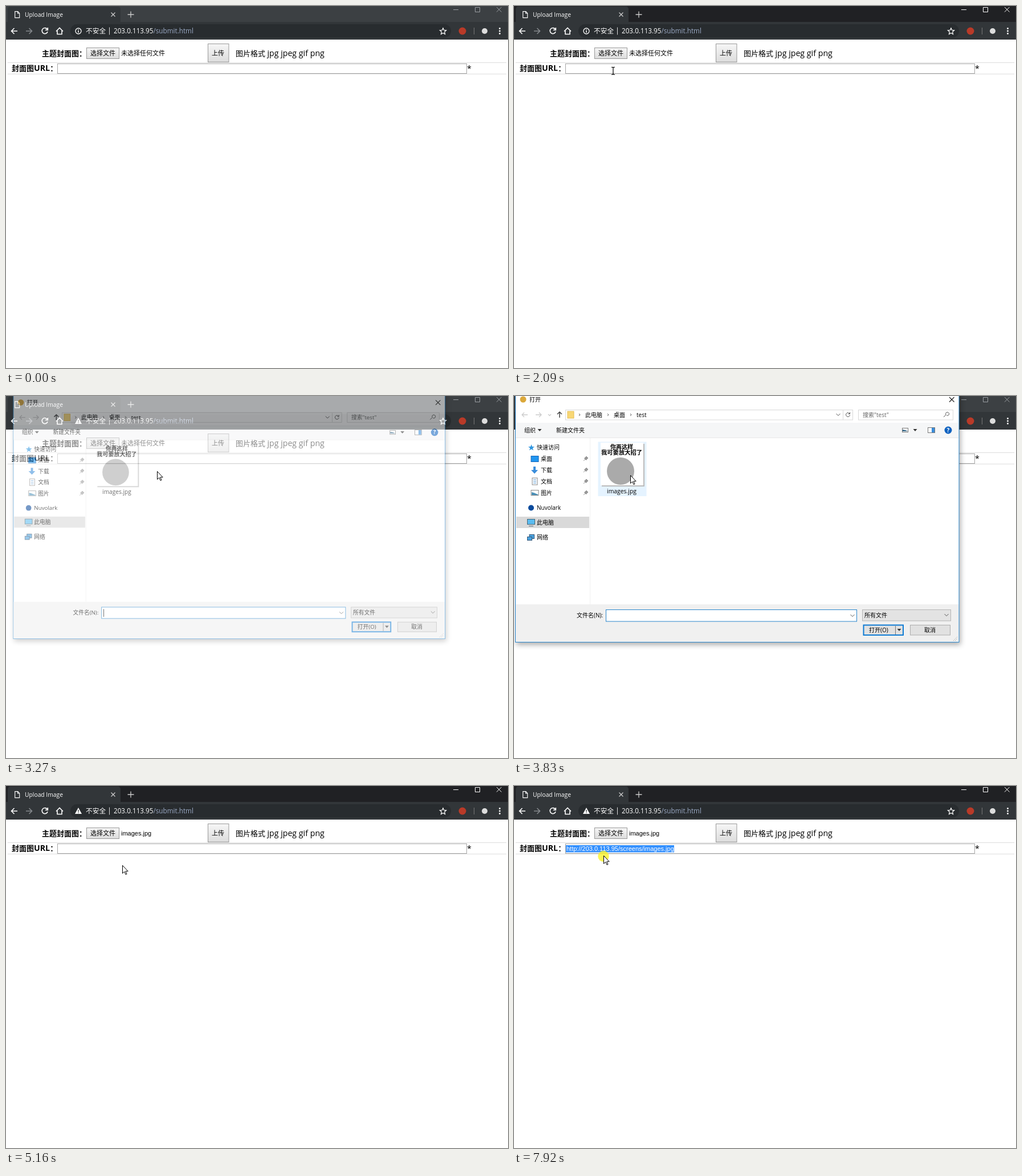
An HTML page for the animation above (8000 ms loop, 881 px wide and 636 px high).

```html
<!DOCTYPE html>
<html lang="zh-CN">
<head>
<meta charset="utf-8">
<title>Upload Image</title>
<style>
html, body { margin: 0; width: 100%; height: 100%; overflow: hidden; background: #fff; }
svg { display: block; width: 881px; height: 636px; font-family: 'Open Sans', 'Noto Sans CJK SC', 'Noto Sans CJK', sans-serif; }
text { white-space: pre; }
.arial { font-family: 'Liberation Sans', 'Noto Sans CJK SC', 'Noto Sans CJK', sans-serif; }
.line { fill: none; stroke: #fff; stroke-width: 1.6; }
.thin { fill: none; stroke: #555; }
#frame { filter: drop-shadow(2px 4px 5px #0005); }
</style>
</head>
<body>
<script>
const LOOP = 8000;
const URL_TEXT = 'http://203.0.113.95/screens/images.jpg';

// Text placed by its left edge and vertical centre.
const label = (x, cy, str, size = 10, attrs = '') =>
  `<text x="${x}" y="${cy + size * 0.37}" font-size="${size}" ${attrs}>${str}</text>`;
const box = (x, y, w, h, fill, stroke = 'none', attrs = '') =>
  `<rect x="${x}" y="${y}" width="${w}" height="${h}" fill="${fill}" stroke="${stroke}" ${attrs}/>`;
const path = (d, attrs = 'class="line"') => `<path d="${d}" ${attrs}/>`;
const dot = (x, y, r, fill, attrs = '') => `<circle cx="${x}" cy="${y}" r="${r}" fill="${fill}" ${attrs}/>`;
const big = str => `<tspan font-size="14.2">${str}</tspan>`;
const chevron = (x, y) => path(`M${x - 3.5} ${y - 2}l3.5 3.5l3.5-3.5`, 'class="thin"');
const triangle = (x, y) => path(`M${x - 3.5} ${y - 2}h7l-3.5 4z`, 'fill="#333"');
const pin = y => path(`M122 ${y + 4}l3-3m-2-2l4 4m-3-4l3-3l3 3l-3 3z`, 'fill="#999" stroke="#999"');

const browser = `
  <rect id="titleBar" width="881" height="29"/>
  ${path('M3 29V6q0-5 5-5H196q5 0 5 5V29z', 'fill="#323639"')}
  ${box(0, 28, 881, 31, '#323639')}
  ${path('M15.7 9.6h5l3 3.2v7.8h-8zm4.8 0v3.4h3.2', 'id="pageIcon" class="line" style="stroke-width:1.1"')}
  ${path('M25 15a5 5 0 1 1-5-5', 'id="spinner" class="line"')}
  ${label(33, 15, 'Upload Image', 10.3, 'fill="#fff"')}
  ${path('M184.5 11.5l7 7m0-7l-7 7M213.5 15h11m-5.5-5.5v11', 'class="line" style="stroke:#ccc;stroke-width:1.3"')}
  ${path('M785 6.5h9M823.5 2.5h8v8h-8zM861 2l8.500 8.500m0-8.500l-8.500 8.500', 'id="winButtons" fill="none"')}
  ${path('M20 44H9.500m5-5l-5 5l5 5M72.500 41a5 5 0 1 0 .5 4M73.300 38v4.300h-4.300M88 44.500l6-6l6 6M90 43.500v6h8v-6')}
  ${path('M35 44h10.500m-5-5l5 5l-5 5', 'class="line" style="stroke:#85898d"')}
  ${box(113, 32, 668, 23.5, '#282c2f', 'none', 'rx="11.700"')}
  <g id="info">${dot(127, 44, 5, 'none', 'stroke="#fff" stroke-width="1.300"')}${path('M127 43.300v3.500m0-5.800v1.300')}</g>
  <g id="warning">${path('M127 38l6 11h-12z', 'fill="#fff"')}${path('M127 42v3.500m0 1v1.300', 'stroke="#282c2f" stroke-width="1.300"')}</g>
  ${label(140, 44, '不安全', 11.7, 'fill="#fff"')}
  ${path('M181.500 37.500v13', 'stroke="#ddd"')}
  ${label(189, 43.5, '203.0.113.95<tspan fill="#9aa9c4">/submit.html</tspan>', 11.7, 'fill="#fff"')}
  ${path('M767 38.700l1.600 3.700l4 .4l-3 2.700l.9 4l-3.500-2.100l-3.500 2.100l.9-4l-3-2.700l4-.4z', 'class="line" style="stroke-width:1.200"')}
  ${dot(801, 44, 6.5, '#b93a28')}
  ${path('M821.500 38v12', 'stroke="#777"')}
  ${dot(840, 44, 5, '#ddd')}
  ${[39.5, 44, 48.500].map(y => dot(866.5, y, 1.4, '#fff')).join('')}`;

const page = `
  ${path('M3 99.500h875M3 119.500h875', 'stroke="#ddd"')}
  ${label(63, 83, '主题封面图：', 13, 'font-weight="bold"')}
  ${box(141.5, 73.5, 57, 19, 'url(#button)', '#999')}
  ${label(148, 83, '选择文件', 11)}
  ${label(202, 83, '', 11, 'id="chosen" class="arial"')}
  ${box(354.5, 66.5, 36.5, 32, 'url(#button)', '#999', 'id="upload"')}
  ${label(361, 83, '上传', 11)}
  ${label(403, 83, '图片格式 ' + big('jpg jpeg gif png'), 13)}
  ${label(10, 109.5, `封面图${big('URL')}：`, 13, 'font-weight="bold"')}
  ${box(90.5, 101.5, 718, 17, '#fff', '#a5a5a5')}
  <rect id="selection" y="104" height="12.500" fill="#3390ff"/>
  ${label(92, 110, URL_TEXT, 11, 'id="url" class="arial"')}
  ${label(809, 110, '*', 14.2)}`;

const sidebar = `
  ${path('M133.500 74v292', 'stroke="#f0f0f0"')}
  ${box(4, 212, 128, 20, '#d9d9d9')}
  ${path('M30.500 85l1.500 4h4l-3.200 2.600l1.200 4l-3.500-2.300l-3.500 2.300l1.200-4l-3.200-2.600h4z', 'fill="#2f96e0"')}
  ${box(30, 105.5, 13, 10, '#2196f0', '#1565b8')}
  ${path('M34 124h4v6h4l-6 6.500l-6-6.500h4z', 'fill="#3a8ddb"')}
  ${box(32, 144, 9, 12, '#fff', '#888')}${path('M34 147h5m-5 3h5m-5 3h5', 'stroke="#5b9bd5"')}
  ${box(30, 165.5, 13, 9, '#fff', '#888')}${path('M31 173v-4l4 1l7 3v1h-11z', 'fill="#4a90b8"')}
  ${dot(30, 196.5, 5, '#0a4a9c')}
  ${box(23.5, 216.5, 13, 9, '#5bbcf0', '#467')}${path('M26 228.500h8', 'stroke="#567"')}
  ${box(27, 243.5, 8.5, 7, '#4aa3e0', '#357')}${box(23.5, 247.5, 8, 6, '#4aa3e0', '#357')}
  ${[['快速访问', 40, 90], ['桌面', 47, 110], ['下载', 47, 130], ['文档', 47, 150], ['图片', 47, 170],
     ['Nuvolark', 40, 196], ['此电脑', 40, 222], ['网络', 40, 248.5]].map(([s, x, y]) => label(x, y, s)).join('')}
  ${[110, 130, 150, 170].map(pin).join('')}`;

const dialog = `
  ${box(2.5, -20, 778.5, 452.5, '#fff', '#2a86cc', 'id="frame"')}
  ${dot(16, 6, 5.5, '#dba83a', 'id="appIcon"')}
  <g id="caption">${label(27, 6, '打开')}</g>
  ${path('M764 2l8.500 8.500m0-8.500l-8.500 8.500', 'fill="none" stroke="#222" stroke-width="1.200"')}
  ${path('M24 33H14m4-4l-4 4l4 4M38 33h10m-4-4l4 4l-4 4M60 32l2.500 2.500l2.500-2.500', 'fill="none" stroke="#ccc" stroke-width="1.300"')}
  ${path('M80 38V28m-4 4l4-4l4 4', 'fill="none" stroke="#444" stroke-width="1.500"')}
  ${box(90.5, 24.5, 504, 17.5, '#fff', '#d9d9d9')}${path('M577.500 24v18', 'stroke="#d9d9d9"')}
  ${box(94, 27, 11, 12, '#f8d775', '#e5bd55')}
  ${path('M114 31l2 2l-2 2M164 31l2 2l-2 2M204 31l2 2l-2 2', 'class="thin"')}
  ${label(125, 33, '此电脑')}${label(175, 33, '桌面')}${label(215, 33, 'test')}
  ${chevron(569, 33)}
  ${path('M589 31a3.500 3.500 0 1 0 .5 2.500M589.500 28.500v3h-3', 'class="thin"')}
  ${box(604.5, 24.5, 166, 17.5, '#fff', '#d9d9d9')}
  ${label(612, 33, '搜索"test"', 10, 'fill="#666"')}
  ${path('M754 37l4-4a3 3 0 1 1 1 1', 'class="thin"')}
  ${box(3, 47, 777, 26, '#f5f6f7')}${path('M3 73.500h777', 'stroke="#e8e8e8"')}
  ${label(18, 60, '组织')}${triangle(45, 60)}${label(74, 60, '新建文件夹')}
  ${box(681.5, 56.5, 10, 7, '#fff', '#777')}${path('M682 62v-3l5 1l4 2z', 'fill="#368"')}${triangle(704, 60)}
  ${box(726.5, 55.5, 12, 9, '#fff', '#777')}${box(733, 56, 5, 8, '#3a8ddb')}
  ${dot(762, 60, 6.5, '#0f62c0')}${label(759.5, 60, '?', 10, 'fill="#fff" font-weight="bold"')}
  ${sidebar}
  ${box(147.5, 80.5, 85, 95.5, 'none', 'none', 'id="item"')}
  ${box(154, 84, 75, 75, '#bbb')}${box(152, 82, 75, 75, '#fff')}
  ${label(169, 89, '你再这样', 10, 'font-weight="bold"')}
  ${label(153, 99.5, '我可要放大招了', 10.3, 'font-weight="bold"')}
  ${dot(187, 132, 24, '#aaa')}
  ${label(163, 167, 'images.jpg', 10.4)}
  ${box(3, 366, 777, 66, '#f0f0f0')}
  ${label(110, 385, '文件名(N):')}
  ${box(161.5, 375.5, 440, 20.5, '#fff', '#2a86cc')}${chevron(594, 386)}
  ${label(164.5, 385.5, 'images.jpg', 10.4, 'id="fileName"')}
  ${path('M165.500 379v14', 'id="caret" stroke="#000"')}
  ${box(611.5, 375.5, 155, 19.5, '#e3e3e3', '#b5b5b5')}${label(615, 385, '所有文件')}${chevron(759, 385)}
  ${box(613.5, 402.5, 69.5, 17.5, '#e1e1e1', '#0f7bd4', 'stroke-width="2"')}
  ${label(623, 411, '打开(O)')}${path('M669.500 404v15', 'stroke="#777"')}${triangle(676, 411)}
  ${box(695.5, 402.5, 70, 17.5, '#e1e1e1', '#adadad')}${label(720, 411, '取消')}
  ${path('M771 430l7-7m-4 7l4-4', 'stroke="#aaa" stroke-dasharray="1.500 1.500"')}`;

document.body.innerHTML = `
<svg viewBox="0 0 881 636">
  <linearGradient id="button" x2="0" y2="1"><stop stop-color="#f6f6f6"/><stop offset="1" stop-color="#dcdcdc"/></linearGradient>
  <linearGradient id="pressed" x2="0" y2="1"><stop stop-color="#d9d9dc"/><stop offset="1" stop-color="#eee"/></linearGradient>
  ${browser}${page}
  <g id="dialog">${dialog}</g>
  <g id="pointer">
    ${dot(0, 1.5, 9.7, '#fbf31c', 'id="halo" opacity=".75"')}
    ${path('M.5.5v14l3.300-3l2.200 5l2-.900l-2.200-4.800h4.400z', 'id="arrow" fill="#fff" stroke="#000"')}
    ${path('M-3-6.500h2l1 1l1-1h2M0-6v12M-3 6.500h2l1-1l1 1h2', 'id="beam" fill="none" stroke="#000" stroke-width="1.200"')}
  </g>
</svg>`;

const el = id => document.getElementById(id);
const show = (id, on) => { el(id).style.display = on ? '' : 'none'; };
const clamp = v => Math.min(1, Math.max(0, v));

// Pointer moves: start, end, number of steps, then waypoints [progress, x, y].
const moves = [
  [130, 550, 6, [0, 900, 640], [1, 428, 396]],
  [850, 1240, 6, [0, 428, 396], [1, 478, 337]],
  [1470, 2250, 11, [0, 478, 337], [.45, 68, 42], [.6, 68, 42], [.818, 174, 114], [1, 167, 77]],
  [2730, 3520, 11, [0, 167, 77], [.727, 279, 140], [1, 241, 143]],
  [3590, 3830, 4, [0, 241, 143], [1, 204, 139]],
  [5610, 6380, 11, [0, 204, 139], [.75, 405, 100], [1, 367, 85]],
  [6460, 6461, 2, [0, 371, 85], [1, 371, 85]],
  [6920, 7310, 6, [0, 371, 85], [1, 312, 111]],
  [7610, 7920, 5, [0, 312, 111], [.2, 311, 111], [1, 157, 122]],
];

function pointerAt(t) {
  const move = moves.filter(m => t >= m[0]).pop();
  if (!move) return [900, 640];
  const [start, end, steps, ...points] = move;
  const step = Math.floor((t - start) / (end - start) * (steps - 1) + 0.1);
  const p = Math.min(1, (step + 1) / steps);
  const i = Math.max(1, points.findIndex(q => q[0] >= p));
  const [a, b] = [points[i - 1], points[i]];
  const k = (p - a[0]) / (b[0] - a[0]);
  return [a[1] + (b[1] - a[1]) * k, a[2] + (b[2] - a[2]) * k];
}

function render(t) {
  const within = (from, to) => t >= from && t < to;
  const inactive = t < 130 || within(3190, 4930);
  el('titleBar').setAttribute('fill', inactive ? '#3c4043' : '#202124');
  el('winButtons').setAttribute('stroke', inactive ? '#9a9ea2' : '#fff');
  show('pageIcon', !within(1860, 1990));
  show('spinner', within(1860, 1990));
  show('info', t < 3190);
  show('warning', t >= 3190);

  el('chosen').textContent = t < 4930 ? '未选择任何文件' : 'images.jpg';
  el('upload').setAttribute('fill', `url(#${within(6610, 6770) ? 'pressed' : 'button'})`);

  const opening = clamp((t - 3160) / 200), closing = clamp((t - 4957) / 203);
  const scale = 1 - 0.06 * (1 - opening) - 0.045 * closing;
  show('dialog', opening > 0 && closing < 1);
  el('dialog').setAttribute('opacity', opening * (1 - closing));
  el('dialog').setAttribute('transform', `translate(391.5 205) scale(${scale}) translate(-391.5 -205)`);
  show('appIcon', t < 4950);
  el('caption').setAttribute('transform', `translate(${t < 4950 ? 0 : -17})`);
  el('item').setAttribute('fill', t < 3590 ? 'none' : t < 4760 ? '#e5f3ff' : '#cce8ff');
  el('item').setAttribute('stroke', t < 4760 ? 'none' : '#99d1ff');
  show('fileName', t >= 4760);
  show('caret', t < 3830 || within(4360, 4760));

  const [x, y] = pointerAt(t);
  const overInput = x > 90 && x < 808 && y > 101 && y < 119;
  el('pointer').setAttribute('transform', `translate(${Math.round(x)} ${Math.round(y)})`);
  show('arrow', !overInput);
  show('beam', overInput);
  show('halo', within(1782, 1860) || within(4760, 4840) || within(6610, 6770) || t >= 7610);

  const selectFrom = t < 7610 ? 281 : y > 118 ? 91 : Math.min(281, x);
  el('selection').setAttribute('x', selectFrom);
  el('selection').setAttribute('width', 281 - selectFrom);
  show('url', t >= 6770);
  el('url').setAttribute('fill', selectFrom === 91 ? '#fff' : '#000');
}

function tick() {
  render(performance.now() % LOOP);
  requestAnimationFrame(tick);
}
tick();
</script>
</body>
</html>
```
